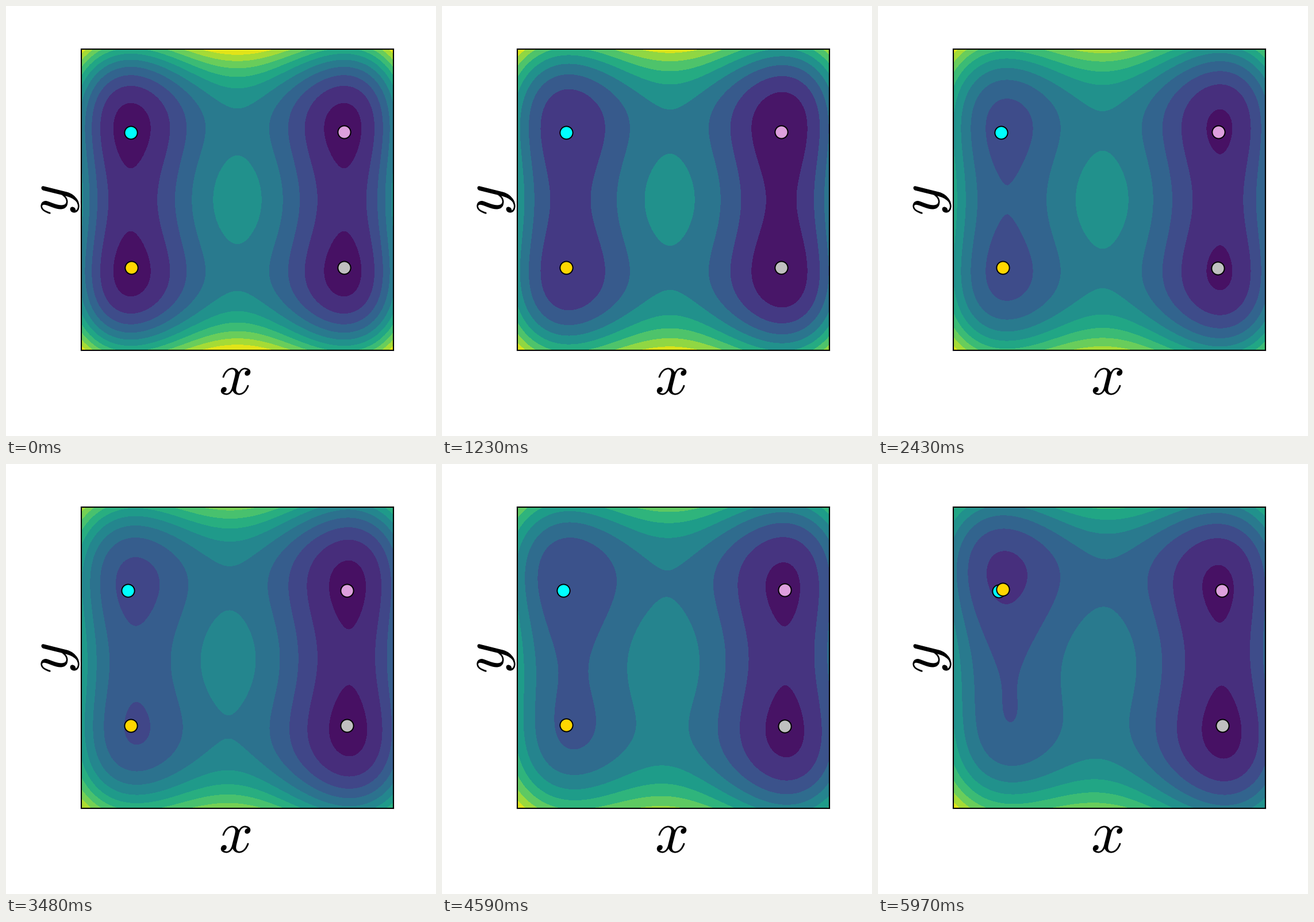
These frames come from a looping animation (748 px wide and 748 px high, 6 s). A matplotlib script:

```python
import numpy as np
import matplotlib.pyplot as plt
from matplotlib.animation import FuncAnimation
from matplotlib.patches import PathPatch
from matplotlib.textpath import TextPath
from matplotlib.transforms import Affine2D

SIZE, DPI = 748, 100
FRAMES, STEP_MS = 200, 30
LEFT, RIGHT, TOP, BOTTOM = 131, 674, 75, 599
HALF_W, HALF_H = (RIGHT - LEFT) / 200, (BOTTOM - TOP) / 200  # 100 px per unit

plt.rcParams["mathtext.fontset"] = "cm"

fig = plt.figure(figsize=(SIZE / DPI, SIZE / DPI), dpi=DPI, facecolor="white")
ax = fig.add_axes([LEFT / SIZE, 1 - BOTTOM / SIZE,
                   (RIGHT - LEFT) / SIZE, (BOTTOM - TOP) / SIZE])
ax.set(xlim=(-HALF_W, HALF_W), ylim=(HALF_H, -HALF_H), xticks=[], yticks=[])
for spine in ax.spines.values():
    spine.set_linewidth(1.5)

X, Y = np.meshgrid(np.linspace(-HALF_W, HALF_W, 121),
                   np.linspace(-HALF_H, HALF_H, 121))


def double_well(q, centre, skew):
    d = q**2 - centre
    return d**2 - skew * d**3


WELLS = double_well(X, 3.44, 0.041) + 0.895 * double_well(Y, 1.54, 0.04) - 1.47


def potential(t):
    """Four wells: tilted sideways for 3 s, then twisted."""
    tilt = min(t, 3)
    twist = max(t - 3, 0)
    extra = tilt * (0.045 - 0.81 * X) + twist * (0.06 + 0.444 * Y - 0.282 * X * Y)
    return 24 + 0.9317 * (WELLS + extra)


def smooth(t, start, end):
    p = np.clip((t - start) / (end - start), 0, 1)
    return p * p * (3 - 2 * p)


def label(text, cx, cy, angle=0):
    """Math glyph with its ink centred on a pixel position."""
    path = TextPath((0, 0), text, size=104)
    box = path.get_extents()
    place = (Affine2D()
             .translate(-(box.x0 + box.x1) / 2, -(box.y0 + box.y1) / 2)
             .rotate_deg(angle)
             .translate(cx, SIZE - cy))
    fig.add_artist(PathPatch(path, fc="black", lw=0, transform=place))


label("$x$", 399.5, 653)
label("$y$", 94, 337.5, 90)

# colour, start x, start y, drift in x per second
BEADS = [("cyan", -1.855, -1.172, -0.011),
         ("gold", -1.859, 1.175, 0.001),
         ("plum", 1.86, -1.178, 0.0165),
         ("silver", 1.86, 1.184, 0.0155)]
jitter = np.random.default_rng(4).normal(0, 0.006, (FRAMES, len(BEADS), 2))
dots = [ax.plot([], [], "o", ms=16, mfc=color, mec="black", mew=1.4,
                zorder=5 + i)[0] for i, (color, *_) in enumerate(BEADS)]
layers = []


def update(frame):
    t = frame * STEP_MS / 1000
    while layers:
        layers.pop().remove()
    layers.append(ax.contourf(X, Y, potential(t), 10, cmap="viridis", zorder=1))
    for i, (color, x, y, drift) in enumerate(BEADS):
        dx, dy = jitter[frame, i]
        if color == "gold":
            y -= 2.36 * smooth(t, 5.0, 5.75)
        dots[i].set_data([x + drift * t + dx], [y + dy])
    return dots


anim = FuncAnimation(fig, update, frames=FRAMES, interval=STEP_MS,
                     init_func=lambda: dots, repeat=True, repeat_delay=0,
                     blit=False)
plt.show()
```
